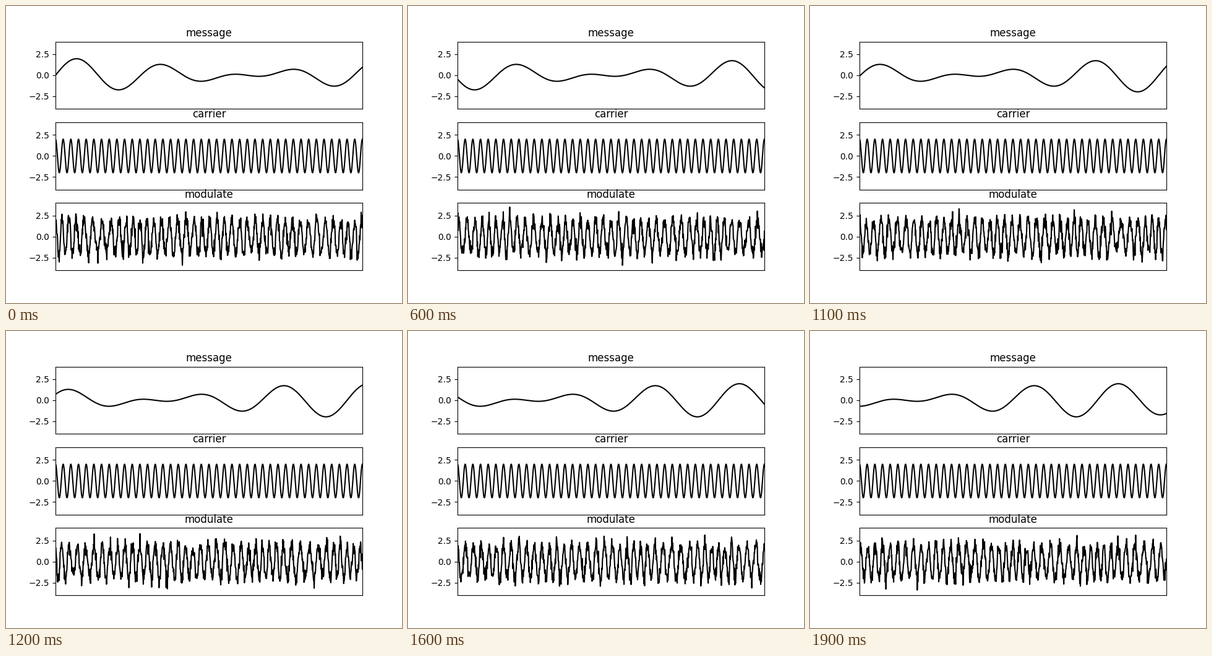
Animation of 640x480 px, one loop 2000 ms. Source, as a matplotlib script:

```python
import numpy as np
import matplotlib.pyplot as plt
from matplotlib.animation import FuncAnimation

FRAMES = 20
INTERVAL = 100   # ms
SPAN = 0.4       # seconds of signal in view
STEP = 0.01      # seconds scrolled per frame
NOISE = 0.5

plt.rcParams["font.family"] = "DejaVu Sans"

t = np.linspace(0, SPAN, 1000)


def message(t):
    return np.sin(2 * np.pi * 10 * t) + np.sin(2 * np.pi * 8 * t)


def carrier(t, phase=0):
    return 2 * np.cos(2 * np.pi * 100 * t + phase)


def modulate(t, msg, seed):
    rng = np.random.default_rng(seed)
    return carrier(t, msg) + NOISE * rng.standard_normal(t.size)


fig, axes = plt.subplots(3, 1, figsize=(6.4, 4.8), dpi=100)
lines = []
for ax, title in zip(axes, ("message", "carrier", "modulate")):
    ax.set_title(title)
    ax.set_xlim(0, SPAN)
    ax.set_ylim(-4, 4)
    ax.set_xticks([])
    ax.set_yticks([-2.5, 0, 2.5])
    lines += ax.plot(t, carrier(t), color="black", lw=1.5)


def update(i):
    msg = message(t + i * STEP)
    lines[0].set_ydata(msg)
    lines[2].set_ydata(modulate(t, msg, i))
    return lines


anim = FuncAnimation(fig, update, frames=FRAMES, interval=INTERVAL,
                     repeat=True, repeat_delay=0)
plt.show()
```
